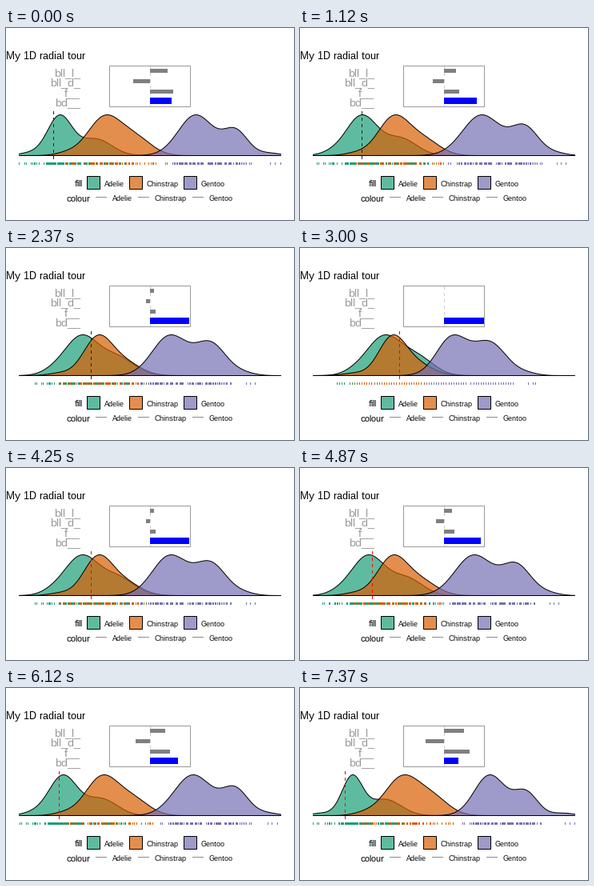
A matplotlib script for the animation above (8000 ms loop, 360x240 px).

```python
import numpy as np
import matplotlib.pyplot as plt
from matplotlib.animation import FuncAnimation
from matplotlib.collections import LineCollection
from matplotlib.patches import Polygon, Rectangle

W, H, DPI = 360, 240, 80
PX = 72 / DPI                      # points per pixel
FRAMES, INTERVAL, STEP = 160, 50, 625
LEFT, RIGHT, BASE, PEAK = 16, 344, 159.5, 51

plt.rcParams.update({
    "font.family": "Liberation Sans",
    "path.snap": False,
    "text.hinting": "native",
    "text.hinting_factor": 1,
})

# Each shape is two bells and a faint tail. Centre, spread and height follow
# the tour angle as c + p cos(a) + q sin(a).
SPECIES = [
    dict(name="Adelie", color="#1b9e77", count=146, tail=-38,
         m1=(123, -18, -55), s1=(7.5, 14.5, 0),
         m2=(132, 16, -34), s2=(20, 0, 0), h2=(.42, 0, 0)),
    dict(name="Chinstrap", color="#d95f02", count=68, tail=-48,
         m1=(140.4, -25.4, -3.5), s1=(17, 0, 5),
         m2=(159, -13, 13.7), s2=(19.5, 0, 0), h2=(.3, 0, .12)),
    dict(name="Gentoo", color="#7570b3", count=119, tail=92,
         m1=(150, 40, 78), s1=(-3, 22.3, 15.2),
         m2=(158, 79, 102.4), s2=(20.5, 0, -6), h2=(.86, 0, -.31)),
]
MARKER = (152.5, -28, -92)
WEIGHTS = (26.4, -25, 34.4)

xs = np.arange(-20, 381, 1.0)
inside = (xs >= LEFT) & (xs <= RIGHT)


def wave(coef, a):
    c, p, q = coef
    return c + p * np.cos(a) + q * np.sin(a)


def bell(m, s):
    return np.exp(-((xs - m) / s) ** 2 / 2)


def density(sp, a):
    m1, s1, m2, s2, h2 = (wave(sp[k], a) for k in ("m1", "s1", "m2", "s2", "h2"))
    d = bell(m1, s1) + h2 * bell(m2, s2) + .06 * bell(m1 + sp["tail"], 14)
    return d / d.max()


def rug_segments(d, u, grid):
    x = np.interp(u, np.cumsum(d) / d.sum(), xs)
    x = np.floor(np.round(x / grid) * grid)
    return [[(v, 168), (v, 171)] for v in np.clip(x, LEFT, RIGHT - 1) + .5]


fig = plt.figure(figsize=(W / DPI, H / DPI), dpi=DPI, facecolor="white")
ax = fig.add_axes([0, 0, 1, 1])
ax.set_xlim(0, W)
ax.set_ylim(H, 0)
ax.axis("off")


def label(x, y, s, size, color="black", ha="left"):
    ax.text(x, y, s, fontsize=size * PX, color=color, ha=ha, va="baseline")


def line(x, y, color, z=1, **kw):
    return ax.plot(x, y, color=color, lw=PX, zorder=z,
                   solid_capstyle="butt", dash_capstyle="butt", **kw)[0]


def box(x, y, w, h, z=1, **kw):
    return ax.add_patch(Rectangle((x, y), w, h, zorder=z, **kw))


# Title, variable names and basis box
label(0, 39, "My 1D radial tour", 13)
box(129.5, 47.5, 101, 51, 4, fill=False, ec="#999999", lw=PX)
line([180.5, 180.5], [48, 98], "#cccccc", dashes=(4, 4))
bars = []
for i, name in enumerate(("bll_l_", "bll_d_", "f__", "bd__")):
    label(93, 60 + 12.5 * i, name, 14, "#999999", "right")
    last = i == 3
    bars.append(box(180, 87 if last else 51 + 13 * i, 0, 8 if last else 5, 3,
                    fc="#0000ff" if last else "#7f7f7f", lw=0))

# Legends
label(86, 198, "fill", 11)
label(75, 217, "colour", 11)
for x, sp in zip((101, 154, 222), SPECIES):
    box(x + .5, 185.5, 16, 16, fc=sp["color"], alpha=.7, lw=0)
    box(x + .5, 185.5, 16, 16, fill=False, ec="black", lw=PX)
    label(x + 22, 198, sp["name"], 9)
    line([x + 11, x + 25], [211.5, 211.5], "#8c8c8c")
    label(x + 32, 216, sp["name"], 9)

# Densities and rugs
rng = np.random.default_rng(7)
layers = []
for i, sp in enumerate(SPECIES):
    u = rng.uniform(.001, .999, sp["count"])
    fill = ax.add_patch(Polygon([(0, 0), (1, 1), (1, 0)], fc=sp["color"],
                                alpha=.7, lw=0, zorder=5 + 2 * i))
    edge = line([], [], "black", 6 + 2 * i)
    rug = LineCollection([], colors=sp["color"], linewidths=PX, zorder=5 + i)
    ax.add_collection(rug)
    layers.append((sp, u, fill, edge, rug))
line([LEFT, RIGHT], [BASE, BASE], "black", 12)
marker = line([0, 0], [164, 104], "black", 13, dashes=(4, 4))


def update(k):
    # Five steps down to angle zero, one extra rest there, six steps up
    n = int((k * INTERVAL + 150) // STEP)
    j = 5 - n if n <= 5 else n - 6
    a = .2 * j
    for bar, w in zip(bars, WEIGHTS):
        bar.set_width(round(w * np.sin(a)))
    bars[3].set_width(round(50 * np.cos(a)))
    for sp, u, fill, edge, rug in layers:
        d = density(sp, a)
        x, y = xs[inside], BASE - PEAK * d[inside]
        fill.set_xy([*zip(x, y), (RIGHT, BASE), (LEFT, BASE)])
        edge.set_data(x, y)
        rug.set_segments(rug_segments(d, u, 3.1 if j == 0 else 1))
    marker.set_xdata([np.floor(wave(MARKER, a)) + .5] * 2)
    marker.set_color("#ff0000" if n >= 5 else "#222222")
    return []


anim = FuncAnimation(fig, update, frames=FRAMES, interval=INTERVAL,
                     init_func=lambda: update(0), repeat=True, repeat_delay=0)
plt.show()
```
